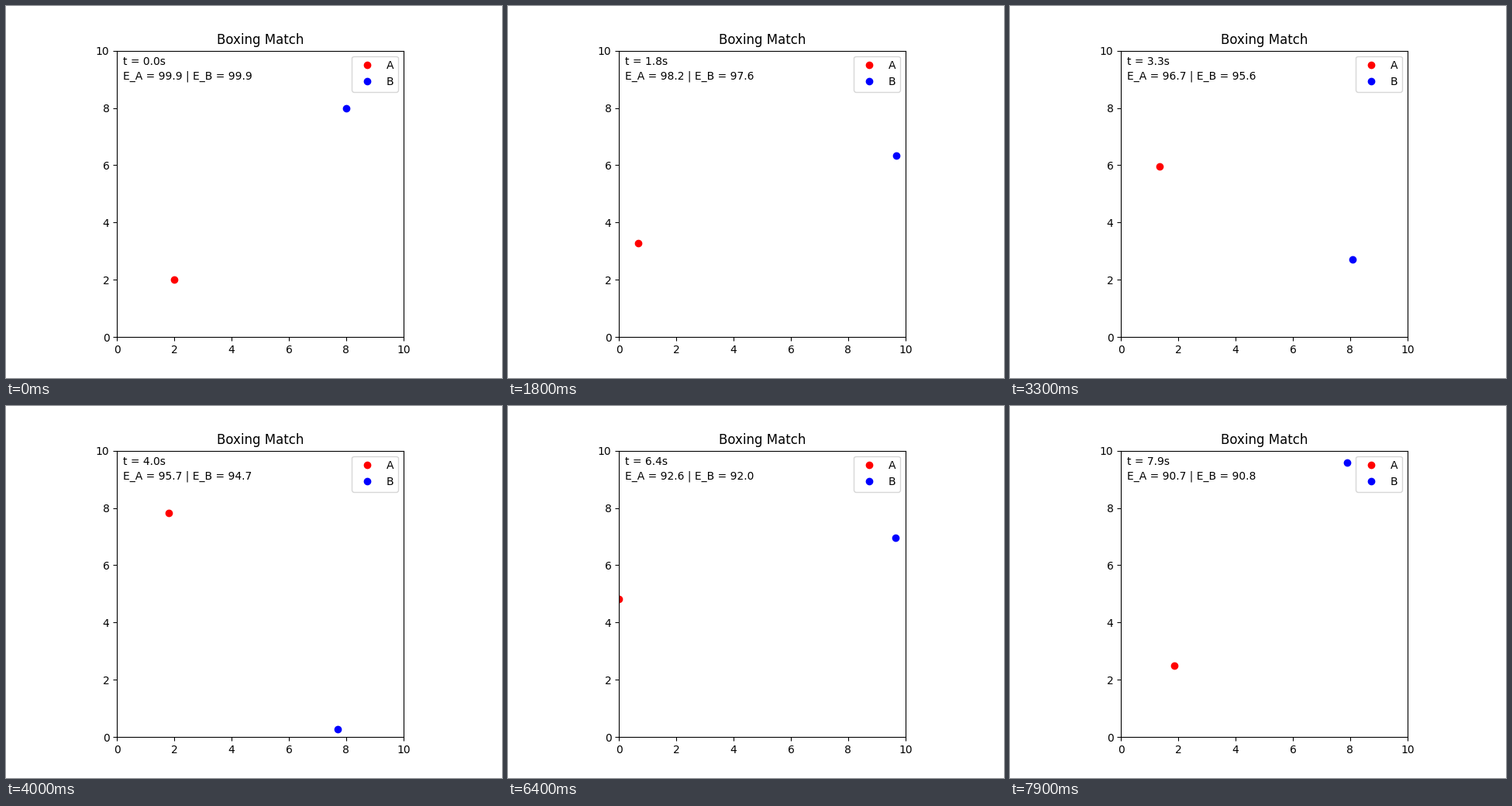
These frames come from a looping animation (640 px wide and 480 px high, 8000 ms). A matplotlib script:

```python
import numpy as np
import matplotlib.pyplot as plt
from matplotlib.animation import FuncAnimation

FRAMES, DT = 80, 0.1
SIZE = 10


def fight(start, phases):
    """Push a fighter around the ring; return positions and energies.

    Each phase is (start time, push, bounce): the push accelerates the fighter
    and costs energy, the bounce scales the speed coming off a wall.
    """
    pos, vel, energy = np.array(start, float), np.zeros(2), 100.0
    path, energies = [], []
    for i in range(FRAMES):
        push, bounce = [p[1:] for p in phases if p[0] <= i / 10][-1]
        push = np.array(push)
        vel = vel + push * DT
        pos = pos + vel * DT
        outside = (pos < 0) | (pos > SIZE)
        vel = np.where(outside, -bounce * vel, vel)
        pos = np.clip(pos, 0, SIZE)
        energy -= np.hypot(*push) * DT
        path.append(pos)
        energies.append(energy)
    return np.array(path), energies


path_a, energy_a = fight((2, 2), [
    (0.0, (-0.706, 0.667), 1.03),
    (3.3, (-0.92, 0.928), 1.08),
])
path_b, energy_b = fight((8, 8), [
    (0.0, (0.88, -0.875), 1.0),
    (1.9, (0.93, -0.95), 1.14),
    (4.1, (0.85, -0.735), 1.02),
    (6.5, (0.57, -0.57), 1.066),
])

fig, ax = plt.subplots(figsize=(6.4, 4.8), dpi=100)
ax.set_xlim(0, SIZE)
ax.set_ylim(0, SIZE)
ax.set_aspect("equal")
ax.set_title("Boxing Match")
dot_a, = ax.plot([], [], "ro", label="A")
dot_b, = ax.plot([], [], "bo", label="B")
clock = ax.text(0.2, 9.5, "")
score = ax.text(0.2, 9.0, "")
legend = ax.legend(loc="upper right")


def update(i):
    dot_a.set_data(path_a[i, :1], path_a[i, 1:])
    dot_b.set_data(path_b[i, :1], path_b[i, 1:])
    clock.set_text(f"t = {i * DT:.1f}s")
    score.set_text(f"E_A = {energy_a[i]:.1f} | E_B = {energy_b[i]:.1f}")
    # The legend makes way while B is in its corner
    x, y = path_b[i]
    covered = 8.19 < x < 9.81 and y > 8.56
    legend.set_loc("lower left" if covered else "upper right")
    return dot_a, dot_b, clock, score, legend


anim = FuncAnimation(fig, update, frames=FRAMES, init_func=lambda: update(0),
                     interval=100, repeat=True, repeat_delay=0, blit=False)
plt.show()
```
